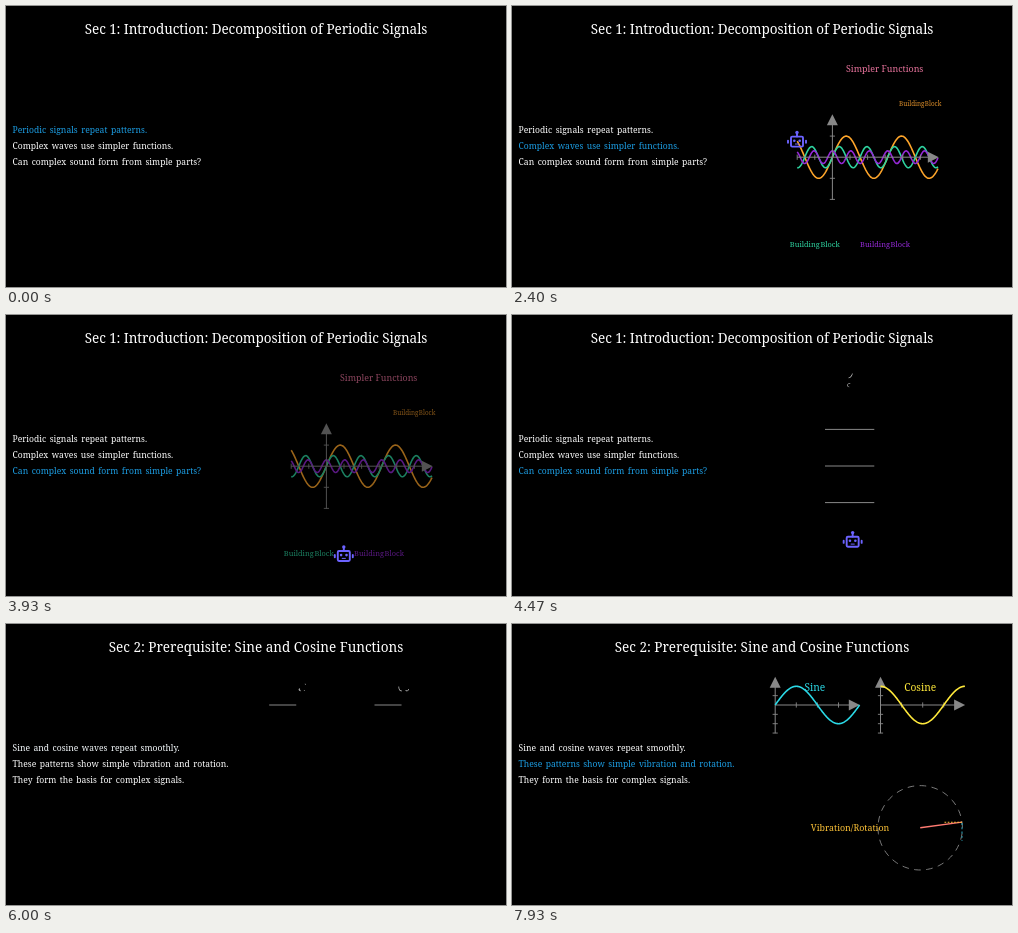
Write an HTML page that moves like this. It is 500 by 281 pixels and loops after 8000 ms.

```html
<!DOCTYPE html>
<html lang="en">
<head>
<meta charset="utf-8">
<title>Periodic signals</title>
<style>
html, body { margin: 0; width: 100%; height: 100%; overflow: hidden; background: #000; }
svg { display: block; width: 100vw; height: 100vh; }
text { font-family: "Noto Serif", "DejaVu Serif", serif; white-space: pre; }
path { fill: none; }
.bullet { font-size: 8.55px; word-spacing: 1.25px; }
.block { word-spacing: -1.3px; }
</style>
</head>
<body>
<svg id="stage" viewBox="0 0 500 281" preserveAspectRatio="none"></svg>
<script>
const LOOP = 8000, FPS = 15, CUT = 5860;
const GREY = '#888', ORANGE = '#ffa62b', GREEN = '#2ed3a0', PURPLE = '#9429d6';
const CYAN = '#2bd9e6', YELLOW = '#ffe93b', GOLD = '#ffc438', BOT = '#6c63ff';
const WHITE = [255, 255, 255], BLUE = [28, 158, 228];

const stage = document.getElementById('stage');
const updates = [];

const clamp = v => Math.min(1, Math.max(0, v));
const ease = u => u * u * u * (10 - 15 * u + 6 * u * u);
const ramp = (t, a, b) => ease(clamp((t - a) / (b - a)));
const mix = (a, b, u) => a + (b - a) * u;
const range = (a, b) => Array.from({ length: b - a + 1 }, (_, i) => a + i);

function make(tag, attrs, parent) {
  const el = document.createElementNS('http://www.w3.org/2000/svg', tag);
  for (const k in attrs) el.setAttribute(k, attrs[k]);
  parent.appendChild(el);
  return el;
}

function group(parent, outStart, outEnd) {
  const g = make('g', {}, parent);
  updates.push(t => g.setAttribute('opacity', 1 - ramp(t, outStart, outEnd)));
  return g;
}

const stroke = (parent, d, color, width) =>
  make('path', { d, stroke: color, 'stroke-width': width, pathLength: 1 }, parent);
const reveal = (path, p) => path.setAttribute('stroke-dasharray', `${p} 2`);

function label(parent, str, x, y, size, color, extra = {}) {
  const el = make('text', { x, y, 'font-size': size, fill: color, 'text-anchor': 'middle', ...extra }, parent);
  el.textContent = str;
  return el;
}

// Letters are outlined first, then filled, one after another.
function writeOn(el, start, end) {
  const str = el.textContent;
  el.textContent = '';
  const letters = [...str].map(ch => {
    const span = make('tspan', { stroke: '#ddd', 'stroke-width': 0.6 }, el);
    span.textContent = ch;
    return span;
  });
  const lag = Math.min(0.2, 4 / (str.length + 1));
  updates.push(t => {
    const head = ramp(t, start, end) * (1 + lag * (letters.length - 1));
    letters.forEach((span, i) => {
      const q = clamp(head - lag * i);
      span.setAttribute('stroke-dasharray', `${q * 20} 200`);
      span.setAttribute('stroke-opacity', q > 0 ? clamp(2 - 2 * q) : 0);
      span.setAttribute('fill-opacity', clamp(2 * q - 1));
    });
  });
}

function plot(parent, fn, o, x0, x1, color, start, end, width = 1.6) {
  const pts = range(0, 240).map(i => {
    const x = mix(x0, x1, i / 240);
    return `${(o.x + x * o.ux).toFixed(2)} ${(o.y - fn(x) * o.uy).toFixed(2)}`;
  });
  const path = stroke(parent, 'M' + pts.join('L'), color, width);
  updates.push(t => reveal(path, ramp(t, start, end)));
}

// Box gives the reach of the axes in pixels around the origin.
function axes(parent, o, box, xTicks, yTicks, start, end) {
  const g = make('g', {}, parent);
  const { x, y } = o;
  const [left, right, up, down] = [x - box.left, x + box.right, y - box.up, y + box.down];
  const xLine = stroke(g, `M${left} ${y}H${right - 10}`, GREY, 1);
  const xMarks = make('path', { stroke: GREY, 'stroke-width': 0.9,
    d: xTicks.map(v => `M${x + v * o.tx} ${y - 2.6}v5.2`).join('') }, g);
  const xTip = make('polygon', { fill: GREY,
    points: `${right},${y} ${right - 11},${y - 5.5} ${right - 11},${y + 5.5}` }, g);
  const yLine = stroke(g, `M${x} ${down}V${up + 10}`, GREY, 1);
  const yMarks = make('path', { stroke: GREY, 'stroke-width': 0.9,
    d: yTicks.map(v => `M${x - 2.6} ${y - v * o.ty}h5.2`).join('') }, g);
  const yTip = make('polygon', { fill: GREY,
    points: `${x},${up} ${x - 5.5},${up + 11} ${x + 5.5},${up + 11}` }, g);
  updates.push(t => {
    const p = ramp(t, start, end);
    reveal(xLine, clamp(p / 0.42));
    reveal(yLine, clamp((p - 0.5) / 0.42));
    [xMarks, xTip].forEach(el => el.setAttribute('opacity', clamp((p - 0.42) / 0.08)));
    [yMarks, yTip].forEach(el => el.setAttribute('opacity', clamp((p - 0.92) / 0.08)));
  });
}

// Each highlight is [fade in start, end, fade out start, end].
function bullets(parent, rows) {
  rows.forEach(([str, hl], i) => {
    const el = make('text', { x: 6.6, y: 127.3 + 15.6 * i, class: 'bullet' }, parent);
    el.textContent = str;
    updates.push(t => {
      const u = hl ? ramp(t, hl[0], hl[1]) - ramp(t, hl[2], hl[3]) : 0;
      el.setAttribute('fill', `rgb(${WHITE.map((w, k) => Math.round(mix(w, BLUE[k], u)))})`);
    });
  });
}

const waves = [
  [x => Math.sin(2 * x), ORANGE],
  [x => 0.5 * Math.sin(4 * x), GREEN],
  [x => 0.3 * Math.cos(6 * x), PURPLE]
];

// First section
const intro = make('g', {}, stage);
label(intro, 'Sec 1: Introduction: Decomposition of Periodic Signals', 250, 28, 13.5, '#fff',
  { 'letter-spacing': -0.08 });
bullets(intro, [
  ['Periodic signals repeat patterns.', [-900, -300, 1330, 1730]],
  ['Complex waves use simpler functions.', [1330, 1730, 3467, 3800]],
  ['Can complex sound form from simple parts?', [3467, 3800, 9000, 9500]]
]);

const big = { x: 320.4, y: 151.2, ux: 17.6, uy: 21.1, tx: 17.6, ty: 21.1 };
const bigGroup = group(intro, 3667, 4267);
for (const [fn, color] of waves) plot(bigGroup, fn, big, -2, 6, color, 1730, 2370);
axes(bigGroup, big, { left: 35.2, right: 106.4, up: 43, down: 42.4 },
  [-2, -1, 1, 2, 3, 4, 5], [-2, -1, 1], 0, 600);

const signal = group(intro, 1330, 1730);
writeOn(label(signal, 'Periodic Signal', 267.5, 100.8, 7.9, '#efbb35'), 300, 900);
plot(signal, x => Math.sin(2 * x) + 0.5 * Math.sin(4 * x), big, -2, 6, '#fff', 600, 1270);

[
  ['Simpler Functions', 372.7, 65.6, 8.9, '#e8739c'],
  ['Building Block', 408.2, 100.3, 6.3, '#e0902a', { class: 'block' }],
  ['Building Block', 302.8, 241, 7.4, GREEN, { class: 'block' }],
  ['Building Block', 373, 241, 7.4, PURPLE, { class: 'block' }]
].forEach(args => writeOn(label(bigGroup, ...args), 1730, 2370));

writeOn(label(intro, '?', 337.8, 72, 24.5, '#ffd23f'), 4200, 4870);
waves.forEach(([fn, color], i) => {
  const o = { x: 334.2, y: 114.4 + 36.6 * i, ux: 10.58, uy: 9.7, tx: 10.58, ty: 9.7 };
  axes(intro, o, { left: 21.2, right: 64.2, up: 14.6, down: 14.6 },
    [-2, -1, 1, 2, 3, 4, 5], [-1], 4267, 4800);
  plot(intro, fn, o, -2, 6, color, 4667, 5067);
});

const robot = make('g', { stroke: BOT, fill: 'none', 'stroke-width': 1.9,
  'stroke-linecap': 'round', 'stroke-linejoin': 'round' }, intro);
make('rect', { x: -6, y: -2.8, width: 12, height: 10, rx: 1.2 }, robot);
make('path', { d: 'M0 -6V-3M-9 1.2V3.4M9 1.2V3.4' }, robot);
make('path', { d: 'M-1.6 4.6H1.6', 'stroke-width': 1 }, robot);
for (const [cx, cy, r] of [[0, -6.9, 1.7], [-2.7, 1.3, 1.3], [2.7, 1.3, 1.3]])
  make('circle', { cx, cy, r, fill: BOT, stroke: 'none' }, robot);
updates.push(t => {
  const a = ramp(t, 2667, 3333), b = ramp(t, 4330, 4930);
  const x = 285 + 52.8 * a + 35.2 * b, y = 133.4 + 105.4 * a - 175.4 * b;
  robot.setAttribute('transform', `translate(${x} ${y})`);
  robot.setAttribute('opacity', ramp(t, 67, 600));
});

// Second section
const trig = make('g', {}, stage);
label(trig, 'Sec 2: Prerequisite: Sine and Cosine Functions', 250, 28, 13.5, '#fff');
bullets(trig, [
  ['Sine and cosine waves repeat smoothly.', [5900, 6470, 7300, 7600]],
  ['These patterns show simple vibration and rotation.', [7300, 7600, 9000, 9500]],
  ['They form the basis for complex signals.', null]
]);

[
  ['Sine', Math.sin, CYAN, 263.2],
  ['Cosine', Math.cos, YELLOW, 368.5]
].forEach(([name, fn, color, x]) => {
  const o = { x, y: 81, ux: 84.4 / (2 * Math.PI), uy: 18.7, tx: 21.1, ty: 9.35 };
  axes(trig, o, { left: 0, right: 84.6, up: 28.2, down: 28.2 },
    [1, 2, 3], [-3, -2, -1, 1], 5825, 6425);
  plot(trig, fn, o, 0, 2 * Math.PI, color, 6440, 7070);
  writeOn(label(trig, name, x + 39.7, 66.9, 10.2, color), 5825, 6425);
});

const hub = { x: 408.2, y: 203.8, r: 42.2 };
const tilt = 0.135;
const onCircle = a => `${hub.x + hub.r * Math.cos(a)} ${hub.y - hub.r * Math.sin(a)}`;
const ring = make('path', { stroke: GREY, 'stroke-width': 0.9, 'stroke-dasharray': '6.6 5.45' }, trig);
const arm = stroke(trig, `M${hub.x} ${hub.y}L${onCircle(tilt)}`, '#ff7b72', 1.4);
const guides = make('g', { 'stroke-width': 1.1 }, trig);
make('path', { d: 'M432.5 198.2H450', stroke: GOLD, 'stroke-dasharray': '1.7 1.5' }, guides);
make('path', { d: 'M450 199V217', stroke: '#2b9fb5', 'stroke-dasharray': '1.9 2.4' }, guides);
writeOn(label(trig, 'Vibration/Rotation', 338, 206.6, 8.9, GOLD), 7300, 7900);
updates.push(t => {
  const p = ramp(t, 7300, 7900), steps = Math.ceil(p * 90);
  ring.setAttribute('d', p > 0
    ? 'M' + range(0, steps).map(i => onCircle(2 * Math.PI * p * i / steps)).join('L') : '');
  reveal(arm, p);
  guides.setAttribute('opacity', ramp(t, 7800, 7920));
});

function draw(now) {
  const t = Math.floor((now % LOOP + 4) * FPS / 1000) * 1000 / FPS;
  intro.setAttribute('display', t < CUT ? 'inline' : 'none');
  trig.setAttribute('display', t < CUT ? 'none' : 'inline');
  updates.forEach(update => update(t));
}

const begun = performance.now();
function tick() {
  draw(performance.now() - begun);
  requestAnimationFrame(tick);
}
tick();
</script>
</body>
</html>
```
